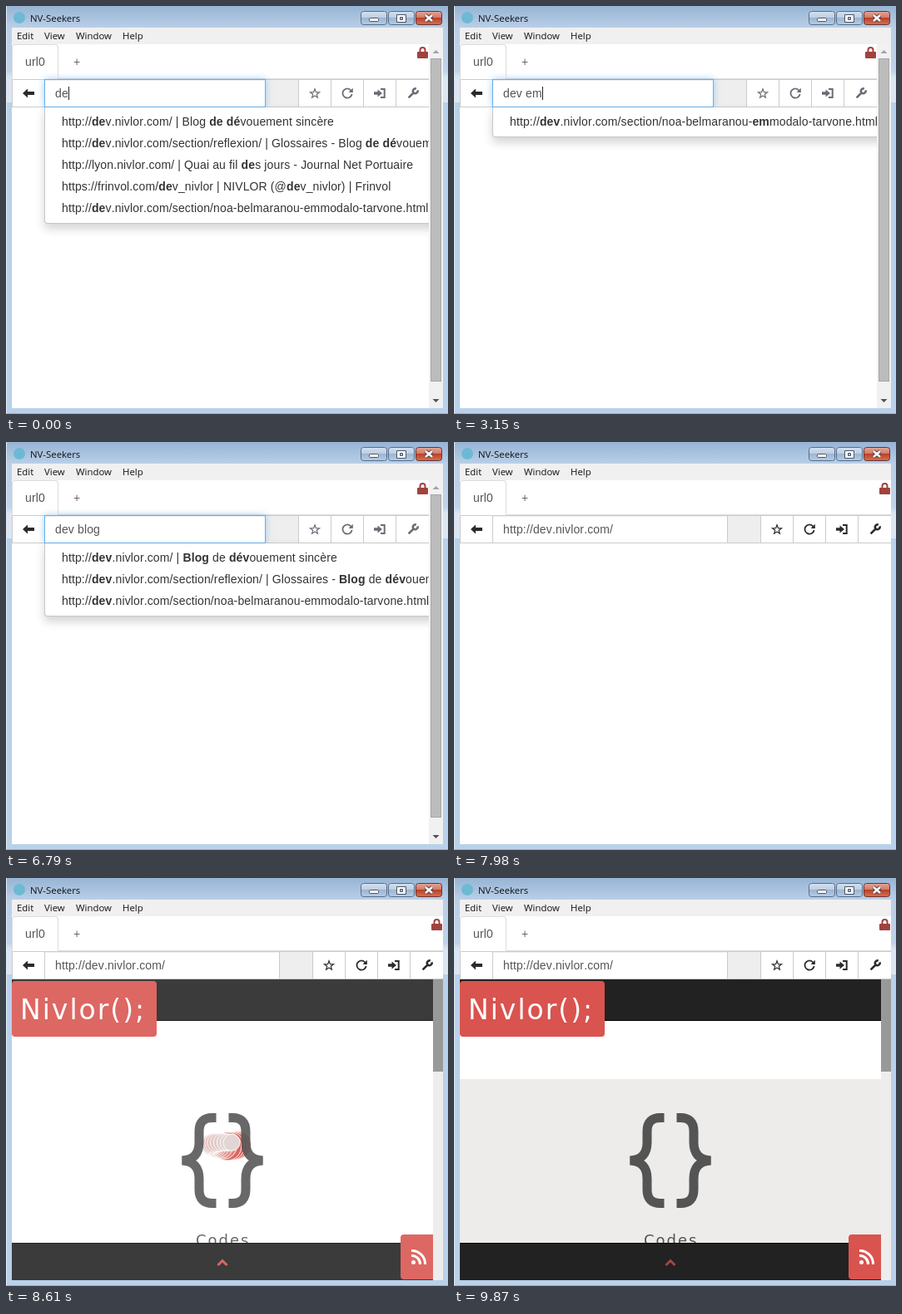
These frames come from a looping animation (531 by 491 pixels, 9940 ms). An HTML page:

```html
<!DOCTYPE html>
<html lang="fr">
<head>
<meta charset="utf-8">
<title>NV-Seekers</title>
<style>
  html, body { margin: 0; width: 100%; height: 100%; overflow: hidden; }
  * { box-sizing: border-box; }
  #stage {
    position: relative; width: 531px; height: 491px; overflow: hidden;
    background: linear-gradient(#97b4d4, #b9cfe7 26px, #bfd3ea 78px, #dbe6f2 86px, #dbe6f2 116px, #b9d1ea 116px);
    border-bottom: 1px solid #5cc5de; border-left: 1px solid #dfeaf5;
    font: 14px/20px "Liberation Sans", Arial, sans-serif; color: #333;
    font-kerning: none; letter-spacing: .13px;
  }
  #stage > * { position: absolute; margin-left: -1px; }
  .ui { font: 11.4px/20px "Open Sans", "Noto Sans", sans-serif; letter-spacing: 0; color: #111; white-space: pre; }
  #menu { left: 7px; top: 26px; width: 518px; height: 20px; background: #f0f0f0; }
  #menu span { position: absolute; top: 0; }
  #content { left: 7px; top: 46px; width: 518px; height: 438px; background: #fff; }

  #view { position: absolute; width: 501px; height: 438px; overflow: hidden; }
  .page #view { width: 518px; }
  #tabs { height: 42px; border-bottom: 1px solid #ddd; }
  #tab { width: 56px; height: 42px; padding: 10px 15px; border: 1px solid #ddd;
    border-bottom-color: #fff; border-radius: 4px 4px 0 0; background: #fff; color: #555; }
  #plus { position: absolute; left: 74px; top: 11px; color: #6e6468; }
  #lock { position: absolute; right: 1px; top: 3px; width: 13px; height: 14px; color: #a1423e; }

  #bar { display: flex; height: 34px; }
  #bar > div { width: 39px; flex: none; border: solid #ccc; border-width: 1px 0 1px 1px; }
  #bar > .btn { display: flex; align-items: center; justify-content: center; color: #6f6a76; }
  .page #bar > .btn, #bar > .btn:first-child { color: #2b2b2b; }
  #bar > .btn:last-child { width: 40px; }
  #bar > .addon { background: #eee; border-left: 0; }
  #bar > #input { flex: 1; padding-left: 12px; line-height: 32px; color: #555; white-space: pre;
    position: relative; border: 1px solid #66afe9; background: #fff;
    box-shadow: inset 0 1px 1px rgba(0,0,0,.075), 0 0 8px rgba(102,175,233,.6); }
  .page #bar > #input { border-color: #ccc; box-shadow: inset 0 1px 1px rgba(0,0,0,.075); }
  #caret { display: inline-block; width: 1px; height: 16px; margin-right: -1px;
    vertical-align: -3px; background: #222; }

  #list { position: absolute; left: 39px; top: 76px; width: 620px; padding: 4px 0 5px;
    background: #fff; border: 1px solid rgba(0,0,0,.22); border-top: 0; border-radius: 0 0 4px 4px;
    box-shadow: 0 6px 12px rgba(0,0,0,.175); white-space: nowrap; }
  #list div { height: 26px; padding: 3px 20px; }
  #list .hover { background: #f3f3f3; }
  .page #list, .page #scroll { display: none; }
  #art, #site { left: 0; top: 0; }
</style>
</head>
<body>
<div id="stage">
  <svg id="art" width="531" height="491">
    <defs>
      <linearGradient id="steel" x2="0" y2="1">
        <stop offset="0" stop-color="#d3e0ef"/><stop offset=".48" stop-color="#bccee3"/>
        <stop offset=".5" stop-color="#9db5d0"/><stop offset="1" stop-color="#b7cce3"/>
      </linearGradient>
      <linearGradient id="red" x2="0" y2="1">
        <stop offset="0" stop-color="#e3a596"/><stop offset=".48" stop-color="#d07a65"/>
        <stop offset=".5" stop-color="#bd4029"/><stop offset="1" stop-color="#d07552"/>
      </linearGradient>
    </defs>
    <circle cx="16" cy="14" r="7" fill="#6db9d3"/>
    <g stroke="#566d8a">
      <rect x="426.5" y="6.5" width="31" height="16" rx="3" fill="url(#steel)"/>
      <rect x="459.5" y="6.5" width="31" height="16" rx="3" fill="url(#steel)"/>
      <rect x="492.5" y="6.5" width="31" height="16" rx="3" fill="url(#red)" stroke="#6b3230"/>
    </g>
    <g fill="#fff" stroke="#4a5568">
      <rect x="436.5" y="14.5" width="11" height="4" rx="1"/>
      <path d="M469.5 10.5h11v9h-11zM473.5 13.5v3h3v-3z" fill-rule="evenodd"/>
    </g>
    <path d="M504 11l8 7m0-7l-8 7" stroke="#5a3a40" stroke-width="4.5"/>
    <path d="M504 11l8 7m0-7l-8 7" stroke="#fff" stroke-width="2.5"/>
  </svg>
  <div class="ui" style="left:29px;top:5px">NV-Seekers</div>
  <div id="menu" class="ui">
    <span style="left:6px">Edit</span><span style="left:39px">View</span>
    <span style="left:77px">Window</span><span style="left:133px">Help</span>
  </div>

  <div id="content">
    <div id="view">
      <div id="tabs"><div id="tab">url0</div><span id="plus">+</span></div>
      <svg id="lock" viewBox="0 0 13 14"><path d="M3.5 7V4a3 3 0 0 1 6 0v3" fill="none" stroke="currentColor" stroke-width="2"/><rect y="6" width="13" height="8" rx="1" fill="currentColor"/></svg>
      <div id="bar">
        <div class="btn" data-fill="M0 7L6 1.5V5H14V9H6V12.5Z"></div>
        <div id="input"><span id="typed"></span><span id="caret"></span></div>
        <div class="addon"></div>
        <div class="btn" data-line="M7 1.8L8.4 5.6 12.5 5.8 9.3 8.3 10.4 12.2 7 10 3.6 12.2 4.7 8.3 1.5 5.8 5.6 5.6Z" data-width="1.2"></div>
        <div class="btn" data-line="M11.5 3.6A5.6 5.6 0 1 0 12.6 8" data-fill="M13.8 .8V6H8.6Z" data-width="1.8"></div>
        <div class="btn" data-line="M8 2H12.7V12H8" data-fill="M0 5.2H4.5V2.5L10 7 4.5 11.5V8.8H0Z"></div>
        <div class="btn" data-line="M1.6 12.4L8 6M10.8 1.6A2.9 2.9 0 1 0 12.5 3.4" data-width="2.6"></div>
      </div>
      <div id="list"></div>
    </div>
    <svg id="scroll" width="17" height="438" style="position:absolute;right:0">
      <rect width="17" height="438" fill="#f1f1f1"/>
      <rect x="2.5" y="17.5" width="12" height="388" fill="#bcbcbc" stroke="#a8a8a8"/>
      <path d="M4.5 11l4-4 4 4z" fill="#a3a3a3"/><path d="M4.5 427l4 4 4-4z" fill="#505050"/>
    </svg>
  </div>

  <svg id="site" width="531" height="491">
    <g id="rail"><rect x="513" y="122" width="12" height="362" fill="#eeedeb"/><rect x="513" y="122" width="12" height="111" fill="#999"/></g>
    <rect id="section" x="7" y="242" width="506" height="197" fill="#edecea"/>
    <g id="trail" stroke="#fff" stroke-width=".9"></g>
    <g id="sheet">
      <g fill="none" stroke="#545454" stroke-width="11">
        <path id="brace" d="M252.5 288.5H248Q232 288.5 232 305V318Q232 339 211.5 340 232 341 232 362V375Q232 391.5 248 391.5H252.5"/>
        <use href="#brace" transform="matrix(-1 0 0 1 520 0)"/>
      </g>
      <text x="228" y="442" font-size="18" letter-spacing="2" fill="#545454" font-family="DejaVu Sans, sans-serif">Codes</text>
      <rect x="7" y="122" width="506" height="50" fill="#222"/><rect x="7" y="171" width="506" height="1" fill="#080808"/>
      <rect x="7" y="439" width="506" height="45" fill="#222"/><rect x="7" y="439" width="506" height="1" fill="#080808"/>
      <rect x="7" y="124" width="174" height="67" rx="4" fill="#d9534f"/>
      <text x="17" y="170" font-size="33" letter-spacing="2" fill="#fff" font-family="DejaVu Sans, sans-serif">Nivlor();</text>
      <path id="chevron" d="M254.5 466L260 460.5 265.5 466" fill="none" stroke="#d9534f" stroke-width="3"/>
      <path d="M513 429H478q-4 0-4 4V479q0 4 4 4H513z" fill="#d9534f"/>
      <g fill="none" stroke="#fff" stroke-width="3">
        <path d="M487 448.5A16 16 0 0 1 503.5 465M487 454.5A10 10 0 0 1 497.5 465"/>
        <circle cx="489.5" cy="462.5" r="2.5" fill="#fff" stroke="none"/>
      </g>
    </g>
  </svg>
</div>

<script>
const LOOP = 9940, TICK = 70, OPEN = 7560;
const HOME = 'http://dev.nivlor.com/';
const bookmarks = [
  HOME + ' | Blog de dévouement sincère',
  HOME + 'section/reflexion/ | Glossaires - Blog de dévouement sincère',
  'http://lyon.nivlor.com/ | Quai au fil des jours - Journal Net Portuaire',
  'https://frinvol.com/dev_nivlor | NIVLOR (@dev_nivlor) | Frinvol',
  HOME + 'section/noa-belmaranou-emmodalo-tarvone.html | Blog'
];

// Each entry changes part of the state from its time on.
const timeline = [
  [0, { text: 'de', query: 'de', caret: true, hover: -1 }],
  [210, { text: 'dev' }], [350, { query: 'dev' }],
  [700, { text: 'dev ' }], [1190, { text: 'dev e' }],
  [1680, { text: 'dev em' }], [1750, { query: 'dev em' }],
  [2170, { text: 'dev emm' }], [2240, { query: 'dev emm' }],
  [2660, { caret: false }],
  [3150, { text: 'dev em', query: 'dev em', caret: true }],
  [3360, { text: 'dev e' }], [3430, { query: 'dev' }],
  [3640, { text: 'dev ' }], [3920, { text: 'dev' }],
  [4480, { caret: false }], [4900, { caret: true, hover: 0 }],
  [5180, { text: 'dev ' }], [5320, { hover: -1 }],
  [5600, { text: 'dev b' }],
  [5810, { text: 'dev bl' }], [5880, { query: 'dev bl' }],
  [6090, { text: 'dev blo' }], [6160, { query: 'dev blo' }],
  [6300, { text: 'dev blog' }], [6370, { query: 'dev blog' }],
  [6790, { caret: false }],
  [7070, { hover: 1 }], [7140, { hover: 0 }], [7280, { caret: true }],
  [OPEN, { text: HOME, caret: false }]
];

const $ = id => document.getElementById(id);
const progress = (t, start, length) => Math.min(1, Math.max(0, (t - start) / length));
const swing = x => 0.5 - Math.cos(Math.PI * x) / 2;
const mix = (a, b, p) => a + (b - a) * p;

for (const button of document.querySelectorAll('.btn')) {
  const { fill = '', line = '', width = 2 } = button.dataset;
  button.innerHTML = `<svg width="14" height="14"><path d="${fill}" fill="currentColor"/>
    <path d="${line}" fill="none" stroke="currentColor" stroke-width="${width}"/></svg>`;
}

function listHtml({ query, hover }) {
  const terms = query.split(' ').map(term => term.replace(/e/g, '[eé]'));
  return bookmarks
    .filter(row => terms.every(term => new RegExp('\\b' + term, 'i').test(row)))
    .map((row, i) => `<div class="${i === hover ? 'hover' : ''}">` +
      row.replace(new RegExp(`\\b(${terms.join('|')})`, 'gi'), '<b>$1</b>') + '</div>')
    .join('');
}

// A ball circling in shallow perspective; every position stays painted.
function trailHtml(t) {
  let html = '';
  for (let at = 8260; at <= Math.min(t, 8680); at += 17.5) {
    const angle = (25 + (at - 8260) * 0.786) * Math.PI / 180;
    const p = Math.sqrt(progress(at, 8330, 280));
    const x = 263 + 16 * Math.cos(angle), y = 320.5 + 2.5 * Math.sin(angle);
    html += `<circle cx="${x}" cy="${y}" r="${mix(17, 10, p)}"
      fill="rgb(${mix(220, 226, p)},${mix(102, 214, p)},${mix(96, 212, p)})"/>`;
  }
  return html;
}

let shownList = '';
function render(t) {
  const state = Object.assign({}, ...timeline.filter(([at]) => at <= t).map(([, change]) => change));
  $('stage').classList.toggle('page', t >= OPEN);
  $('typed').textContent = state.text;
  $('caret').style.visibility = state.caret ? 'visible' : 'hidden';
  const html = listHtml(state);
  if (html !== shownList) $('list').innerHTML = shownList = html;

  $('rail').style.opacity = t >= 8050 ? 1 : 0;
  $('sheet').style.opacity = swing(progress(t, 8131, 617));
  $('trail').innerHTML = t < 8750 ? trailHtml(t) : '';
  $('trail').style.opacity = 1 - progress(t, 8610, 140);
  const reveal = swing(progress(t, 8960, 910));
  $('section').style.opacity = reveal;
  $('chevron').style.opacity = mix(1, 0.72, reveal);
}

const start = performance.now();
function frame() {
  const t = (performance.now() - start) % LOOP;
  render(Math.floor(t / TICK) * TICK);
  requestAnimationFrame(frame);
}
frame();
</script>
</body>
</html>
```
